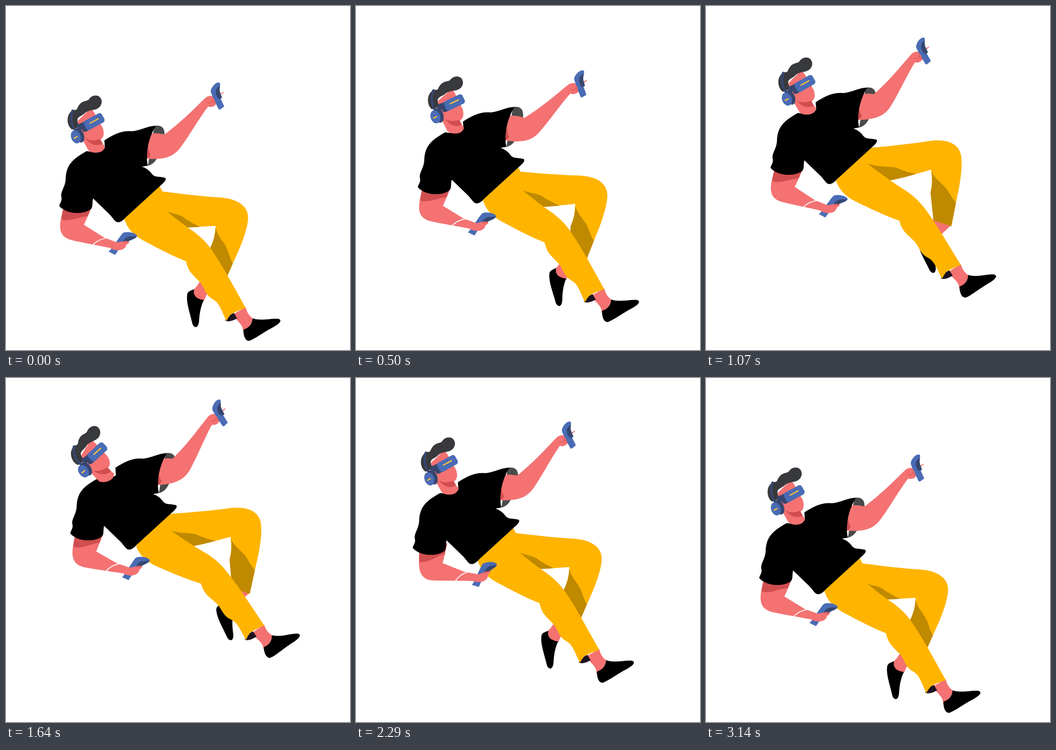
These frames come from a looping animation (640x640 px, 3.21 s). An HTML page with a canvas:

```html
<!DOCTYPE html>
<html lang="en">
<head>
<meta charset="utf-8">
<title>Floating VR player</title>
<style>
  html, body { margin: 0; width: 100%; height: 100%; overflow: hidden; background: #fff; }
  canvas { display: block; width: 640px; height: 640px; }
</style>
</head>
<body>
<canvas id="stage" width="640" height="640"></canvas>
<script>
const ctx = document.getElementById('stage').getContext('2d');
const LOOP = 3210, FPS = 14;

const C = {
  skin: '#f47272', skinDark: '#d14e50', pants: '#ffb400', pantsDark: '#bf8900',
  black: '#000', cuff: '#4a4a4a', inside: '#1e1220', hair: '#38393c',
  blue: '#4a6cb5', navy: '#36466e', yellow: '#f8c036', white: '#fff'
};

// Tracks: [step, value] pairs; angles in radians, counter-clockwise positive.
const tracks = {
  x: [[0, 0], [7, 16], [15, 21], [23, 20.5], [32, 6.5], [39, -1], [44, 0]],
  y: [[0, 0], [7, -35], [8, -40], [15, -71], [16, -75.3], [20, -83.8], [23, -83], [32, -56], [39, -25], [44, 0]],
  head: [[0, 0], [7, -.05], [15, .015], [23, .244], [32, .005], [39, 0], [44, 0]],
  armUp: [[0, 0], [7, -.082], [8, -.088], [15, .09], [16, .115], [20, .152], [23, .14], [32, .037], [39, -.006], [44, 0]],
  armLow: [[0, 0], [7, .012], [15, -.018], [23, .043], [32, .187], [39, .168], [44, .015]],
  legBack: [[0, 0], [7, .038], [15, .22], [23, .2], [32, .008], [39, 0], [44, 0]],
  legFront: [[0, 0], [7, 0], [15, .04], [23, .08], [32, 0], [39, 0], [44, 0]]
};

// Smooth interpolation that never overshoots its keys.
function at(keys, s) {
  const last = keys.length - 1;
  if (s >= keys[last][0]) return keys[last][1];
  const slope = i => (keys[i + 1][1] - keys[i][1]) / (keys[i + 1][0] - keys[i][0]);
  const tangent = i => {
    if (i === 0) return slope(0);
    if (i === last) return slope(last - 1);
    const a = slope(i - 1), b = slope(i);
    return a * b <= 0 ? 0 : 2 * a * b / (a + b);
  };
  let i = 0;
  while (s >= keys[i + 1][0]) i++;
  const [s0, v0] = keys[i], [s1, v1] = keys[i + 1];
  const h = s1 - s0, u = (s - s0) / h, w = 1 - u;
  return v0 * (1 + 2 * u) * w * w + tangent(i) * h * u * w * w
       + v1 * u * u * (3 - 2 * u) - tangent(i + 1) * h * u * u * w;
}

const shape = (color, d) => ({ color, path: new Path2D(d) });
const line = (color, width, d) => ({ color, width, path: new Path2D(d) });

const legBack = [
  shape(C.skin, 'M374 500 L361 512 Q354 524 348 528 L352 546 L368 549 L374 536 L404 518Z'),
  shape(C.black, 'M350 527 C347 539 355 545 368 547 C361 562 360 575 359 588 C357 601 350 599 347 592 C342 570 335 552 337 537 C338 530 345 529 350 527Z'),
  shape(C.pants, 'M245 350 L291 345 C330 350 365 354 395 356 C433 358 454 374 450 400 C447 424 433 456 422 479 L404 520 L374 502 L380 450 Q389 432 390 409 L338 412 L300 412Z'),
  shape(C.pantsDark, 'M270 370 Q282 375 293 380 C310 387 325 387 334 396 Q346 404 361 411 L338 412 L300 412Z'),
  shape(C.pantsDark, 'M390 413 C396 434 409 440 414 460 Q417 470 422 479 L404 520 L374 502 L380 450 Q389 432 390 413Z')
];

const legFront = [
  shape(C.skin, 'M422 574 L446 560 C448 570 452 576 460 582 L450 602 L441 606 C442 592 430 588 422 574Z'),
  shape(C.black, 'M442 602 C451 599 457 594 459 581 C475 587 494 580 507 582 C515 585 508 591 500 596 C480 606 461 621 452 623 C445 623 441 612 442 602Z'),
  shape(C.inside, 'M408 585 C412 589 424 585 430 581 L424 571 L410 578Z'),
  shape(C.pants, 'M220 396 L280 328 L287 337 L292 347 L279 366 L323 401 L338 412 C355 423 368 434 380 450 C393 468 402 484 412 501 L446 562 Q427 568 418 574 Q413 580 410 586 C402 570 398 554 387 547 C370 538 372 528 361 514 C348 500 339 495 335 475 C310 465 285 452 255 436 C235 425 225 412 220 396Z')
];

const armLow = [
  shape(C.blue, 'M191 457 L203 463 L214 447 C226 435 240 436 244 428 C242 421 224 419 218 422 C210 430 201 447 191 457Z'),
  shape(C.navy, 'M217 440 C224 425 234 430 243 428 C241 434 231 432 226 441Z'),
  shape(C.skin, 'M108 372 C99 405 94 427 120 435 C140 440 170 445 193 450 C207 458 222 455 224 444 Q230 441 229 439 Q227 435 207 440 L183 431 L145 407 Q153 391 160 372Z'),
  shape(C.skinDark, 'M108 372 Q104 386 103 397 C118 402 137 392 152 391 L160 372Z'),
  line(C.white, 1.6, 'M160 446 Q171 434 186 432'),
  line(C.skinDark, 1, 'M218 440 L228 438')
];

const sleeveBack = [
  shape(C.cuff, 'M276 223 C290 221 295 227 295 239 C294 255 286 275 280 285 Q274 295 264 297Z')
];

const armUp = [
  shape(C.skin, 'M255 240 Q275 234 295 239 C325 217 349 192 371 171 C378 165 386 167 390 172 L392 180 Q390 187 380 188 L376 187 C360 208 343 238 329 257 C316 277 302 287 262 284 L250 283Z'),
  shape(C.skinDark, 'M262 258 C267 265 264 271 269 276 Q269 281 260 284Z'),
  line(C.skin, 2, 'M397 165 L404 161'),
  shape(C.blue, 'M398 143 C391 139 380 153 381 160 L384 168 L395 191 Q397 194 399 192 L406 187 L398 169 C393 158 400 151 398 143Z'),
  shape(C.navy, 'M398 149 C388 153 388 164 396 173 L402 171 C400 163 396 160 398 149Z'),
  shape(C.skin, 'M374 173 Q384 168 388 174 L390 181 Q385 187 378 186Z'),
  line(C.skinDark, 1, 'M376 180 Q384 182 386 174 M385 175 L389 181')
];

const shirt = [
  shape(C.black, 'M150 270 C123 285 112 296 111 322 C110 338 101 345 103 355 C105 362 100 367 99 372 C110 386 141 390 158 378 C162 374 160 367 162 358 L193 388 C200 395 203 404 211 402 Q216 401 223 393 L293 329 C299 323 298 319 293 319 C284 317 277 319 272 313 Q264 302 253 299 L264 297 C259 276 265 244 279 223 C262 223 253 231 235 233 C216 231 201 238 183 250 L184 264 Q170 274 150 270Z')
];

const head = [
  shape(C.hair, 'M128 193 C111 197 111 222 123 230 L134 225Z'),
  line(C.navy, 5, 'M124 195 C119 206 122 220 129 231'),
  shape(C.skin, 'M133 214 L158 190 L164 198 L180 227 C184 239 181 247 174 249 L184 261 C183 276 158 275 153 268 L143 250Z'),
  shape(C.skinDark, 'M148 246 C157 252 167 250 175 247 L180 256 C170 262 156 258 148 246Z'),
  shape(C.hair, 'M126 195 L132 192 C138 177 145 178 153 175 C158 168 162 167 166 166.500 C178 166 182 180 174 188 C166 196 156 191 146 200 C140 206 128 206 135 220 L133 227 L128 226 C122 213 123 204 126 195Z')
];

const dash = (x, y, w) => line(C.yellow, 2.4, `M${x} ${y} h${w}`);

function paint(parts) {
  for (const p of parts) {
    if (p.width) {
      ctx.lineWidth = p.width;
      ctx.strokeStyle = p.color;
      ctx.stroke(p.path);
    } else {
      ctx.fillStyle = p.color;
      ctx.fill(p.path);
    }
  }
}

function turned(x, y, angle, draw) {
  ctx.save();
  ctx.translate(x, y);
  ctx.rotate(-angle);
  ctx.translate(-x, -y);
  draw();
  ctx.restore();
}

function box(color, x, y, w, h, r) {
  ctx.fillStyle = color;
  ctx.beginPath();
  ctx.roundRect(x, y, w, h, r);
  ctx.fill();
}

function oval(color, x, y, rx, ry) {
  ctx.fillStyle = color;
  ctx.beginPath();
  ctx.ellipse(x, y, rx, ry, -.35, 0, Math.PI * 2);
  ctx.fill();
}

const goggleDash = dash(156, 214, 17);
const earDash = dash(126.5, 244.5, 6);

function drawHead() {
  paint(head);
  turned(164, 215, .5, () => {
    box(C.navy, 137, 206, 20, 18, 5);
    box(C.blue, 145, 205.5, 38, 19, 5);
    paint([goggleDash]);
  });
  turned(140, 224, .5, () => box(C.navy, 133, 218, 10, 11, 2));
  oval(C.navy, 136.5, 240.5, 8.5, 14);
  oval(C.blue, 130, 243.5, 9, 12.5);
  turned(129.5, 244.5, .5, () => paint([earDash]));
}

function draw(step) {
  const v = name => at(tracks[name], step);
  ctx.fillStyle = '#fff';
  ctx.fillRect(0, 0, 640, 640);
  ctx.save();
  ctx.lineCap = 'round';
  ctx.translate(v('x'), v('y'));
  turned(242, 358, v('legBack'), () => paint(legBack));
  turned(222, 378, v('legFront'), () => paint(legFront));
  turned(115, 352, v('armLow'), () => paint(armLow));
  paint(sleeveBack);
  turned(249, 275, v('armUp'), () => paint(armUp));
  paint(shirt);
  turned(179, 276, v('head'), drawHead);
  ctx.restore();
}

const start = performance.now();
function tick() {
  const t = (performance.now() - start) % LOOP;
  draw(Math.min(44, Math.floor((t + 5) * FPS / 1000)));
  requestAnimationFrame(tick);
}
tick();
</script>
</body>
</html>
```
